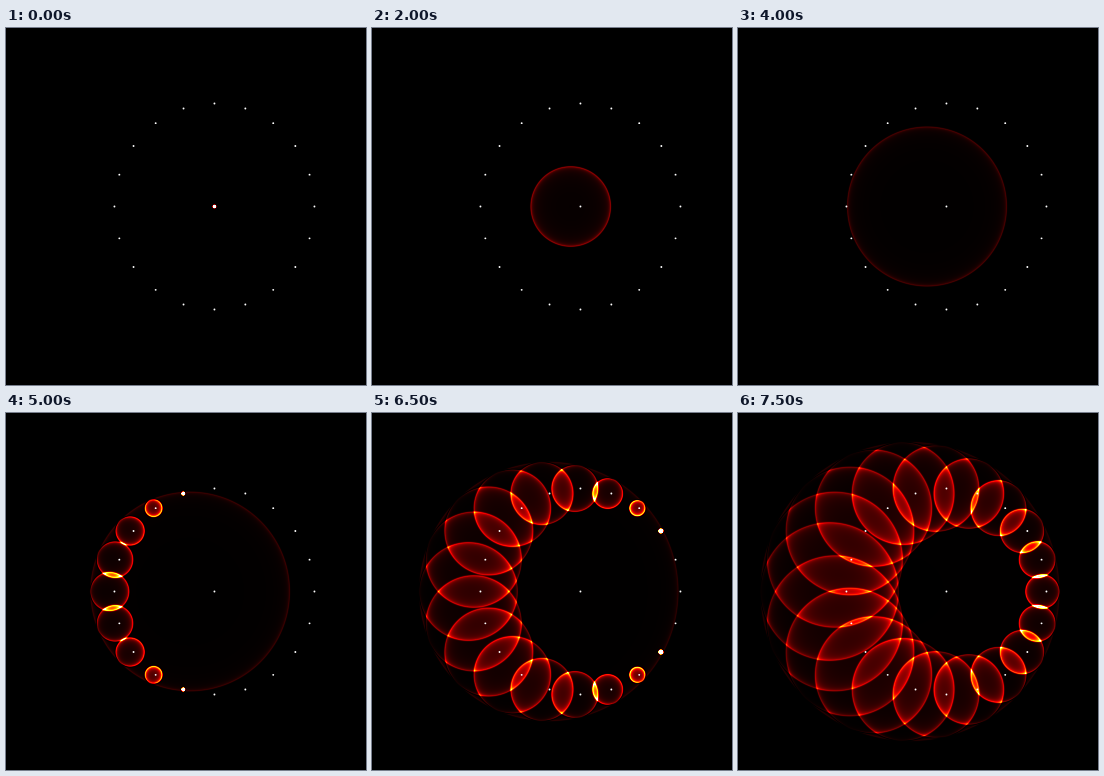
These frames come from a looping animation (360x357 px, 8 s). An HTML page with a canvas:

```html
<!DOCTYPE html>
<html lang="en">
<head>
<meta charset="utf-8">
<title>Scattered wave</title>
<style>
html, body { margin: 0; height: 100%; overflow: hidden; background: #000; }
canvas { display: block; }
</style>
</head>
<body>
<canvas id="stage" width="360" height="357"></canvas>
<script>
const W = 360, H = 357, STEP = 500, STEPS = 16;
const CX = 208.45, CY = 178.5;
const SPEED = 9.93, DRIFT = 2.43; // pixels per step
const STRENGTH = 3.9;
const ctx = document.getElementById('stage').getContext('2d');
const field = new Float32Array(W * H);
const image = ctx.createImageData(W, H);

// Scatterers, each with the step at which the drifting wave reaches it.
const points = Array.from({ length: 20 }, (_, i) => {
  const a = i * Math.PI / 10;
  const x = 100 * Math.sin(a), y = -103 * Math.cos(a);
  const k = SPEED ** 2 - DRIFT ** 2;
  const hit = (DRIFT * x + Math.sqrt((DRIFT * x) ** 2 + k * (x * x + y * y))) / k;
  return { x: CX + x, y: CY + y, hit };
});

// Two-dimensional pulse: a sharp front with a tail of 1 / sqrt(r² - q²) inside.
function addWave(x, y, age, strength) {
  if (age < 0) return;
  const r = Math.max(age * SPEED + 0.75, 1.5);
  const cx = x - DRIFT * age, reach = r + 3;
  const x0 = Math.max(0, Math.floor(cx - reach)), x1 = Math.min(W, cx + reach);
  const y0 = Math.max(0, Math.floor(y - reach)), y1 = Math.min(H, y + reach);
  for (let j = y0; j < y1; j++) {
    for (let i = x0; i < x1; i++) {
      const q = Math.hypot(i + 0.5 - cx, j + 0.5 - y), d = r - q;
      if (d < -3) continue;
      const edge = d < 0.7 ? Math.exp(-((d - 0.7) ** 2)) : 1;
      field[j * W + i] += strength * edge / Math.sqrt(Math.max(d * (r + q), 2 * r));
    }
  }
}

// Intensity is the squared amplitude, shown from black through red and yellow to white.
function paintField() {
  for (let i = 0; i < field.length; i++) {
    const v = field[i] ** 2, p = i * 4;
    image.data[p] = 255 * v / 0.365;
    image.data[p + 1] = 255 * (v - 0.365) / 0.381;
    image.data[p + 2] = 255 * (v - 0.746) / 0.254;
    image.data[p + 3] = 255;
  }
  ctx.putImageData(image, 0, 0);
}

function dot({ x, y }) {
  ctx.beginPath();
  ctx.arc(x, y, 0.95, 0, 7);
  ctx.fill();
}

function draw(step) {
  field.fill(0);
  addWave(CX, CY, step, STRENGTH);
  // Scattered waves have the opposite sign and cancel the front they touch.
  for (const p of points) addWave(p.x, p.y, step - p.hit, -STRENGTH);
  paintField();
  ctx.fillStyle = '#fff';
  points.forEach(dot);
  dot({ x: CX, y: CY });
}

const start = performance.now();
let shown = -1;
function tick() {
  const step = Math.floor((performance.now() - start) / STEP) % STEPS;
  if (step !== shown) draw(shown = step);
  requestAnimationFrame(tick);
}
tick();
</script>
</body>
</html>
```
